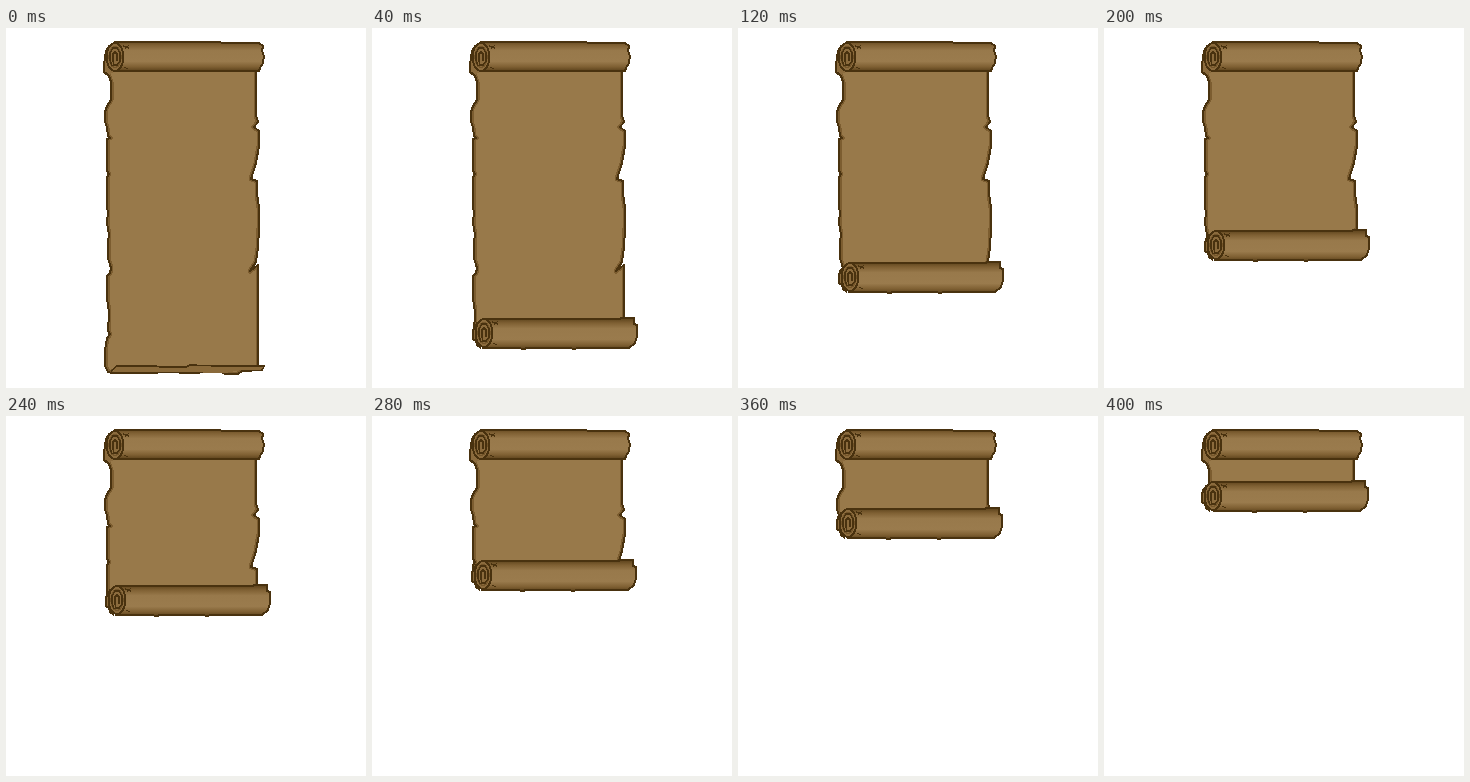
These frames come from a looping animation (360x360 px, 0.44 s). An HTML page:

```html
<!DOCTYPE html>
<html lang="en">
<head>
<meta charset="utf-8">
<title>Scroll rolling up</title>
<style>
  html, body { margin: 0; width: 100%; height: 100%; overflow: hidden; background: #fff; }
  svg { display: block; width: 100vw; height: 100vh; }
  .ink { fill: none; stroke: #49320f; stroke-width: 2; stroke-linejoin: round; }
  .soft { fill: none; stroke: #73552a; stroke-width: 1.5; }
  .rim { fill: none; stroke: #7c5d30; stroke-width: 5; stroke-linejoin: round; }
  .paper { fill: #98794a; }
  .body { fill: url(#round); }
</style>
</head>
<body>
<svg viewBox="0 0 360 360" shape-rendering="crispEdges">
  <defs>
    <linearGradient id="round" x1="0" y1="0" x2="0" y2="1">
      <stop offset="0" stop-color="#62471f"/>
      <stop offset=".14" stop-color="#806134"/>
      <stop offset=".32" stop-color="#98794b"/>
      <stop offset=".68" stop-color="#9a7b4d"/>
      <stop offset=".86" stop-color="#7f6033"/>
      <stop offset="1" stop-color="#5c421c"/>
    </linearGradient>
    <clipPath id="visible"><rect id="window" width="360" height="360"/></clipPath>
    <clipPath id="inside"><use href="#sheet"/></clipPath>
    <path id="sheet" d="M99 40V45L103 48 105 54V72L101 78 99 84V93L101 100 102 108 104 110 101 111V143L103 146 101 149V180L102 184 101 195 103 207 102 213V230L105 240 104 245 101 248V270L103 285 102 303 104 306 101 310 99 322V338L102 344 107 345H150L153 344H172L175 345 215 344 219 346H232L236 343 256 342 258 338H252V237L244 243 250 234 252 220 253 200V180L251 165V153L245 151 250 135 253 118V103L248 99 252 94 250 87V40Z"/>
    <g id="coil">
      <ellipse rx="9" ry="14" fill="#8b6b3d" class="edge"/>
      <ellipse rx="8.5" ry="14" class="ink"/>
      <ellipse rx="6" ry="10.5" class="soft"/>
      <path class="ink" style="stroke-width:1.6" d="M-3 9L-5 3V-4L-2 -9H2L5 -4V4L2 8H-1L-2 4V-3L0 -5 2 -3V4"/>
      <path class="ink" style="stroke-width:1.3" d="M8 -11L14 -9M10 -8L14 -12M9 10L13 12"/>
    </g>
  </defs>

  <g clip-path="url(#visible)">
    <use href="#sheet" class="paper"/>
    <use href="#sheet" class="rim" clip-path="url(#inside)"/>
    <use href="#sheet" class="ink"/>
    <path class="soft" d="M104 343L112 338"/>
    <path d="M110 338H182L184 337H253L257 339 255 342 236 342 219 345 175 344 107 344Z" fill="#8a6a3b"/>
    <path class="ink" style="stroke-width:1.5" d="M105 343L111 338H150L154 339H180L184 337 212 338H257"/>
  </g>

  <g id="top">
    <path d="M103 17L100 24 98 36V44L103 47 109 43Z" fill="#8b6b3d"/>
    <path class="ink" d="M104 17L100 23 98 36V44L103 47"/>
    <path class="body" d="M108 14H173L180 13H212L216 14H253L257 18 256 23 259 28 258 35 254 40 253 43H108Z"/>
    <path class="ink" d="M108 14H173L180 13.5H212L216 15H253L257 18 256 23 258 28 257 35 254 40 253 43H108"/>
    <use href="#coil" x="109" y="29"/>
  </g>

  <g id="roll">
    <g id="bar">
      <path class="body" d="M111 1H262V6L266 7V18L263 25 257 30H206L202 31 198 30H156L151 31 147 30H110Z"/>
      <path class="ink" d="M111 1H247L250 0H262V6L265 7V18L263 25 257 30H206L202 31 198 30H156L151 31 147 30H110"/>
    </g>
    <g id="end">
      <path d="M107 4L102 8 101 21 106 25 112 29V4Z" fill="#8b6b3d"/>
      <path class="ink" d="M106 4L102 9 101 14V21L104 23 105 27 109 30"/>
      <use href="#coil" x="112" y="15"/>
    </g>
  </g>
</svg>
<script>
  const STEP = 40;
  const tops = [338, 290, 261, 234, 218, 202, 169, 144, 119, 92, 65];
  const el = id => document.getElementById(id);
  const win = el("window"), roll = el("roll"), bar = el("bar"), end = el("end");
  const shift = (node, x, y) => node.setAttribute("transform", `translate(${x} ${y})`);

  function draw(ms) {
    const i = Math.floor(ms / STEP) % tops.length;
    const y = tops[i], open = i === 0;
    roll.setAttribute("display", open ? "none" : "inline");
    win.setAttribute("height", open ? 360 : y + 15);
    shift(roll, 0, y);
    shift(bar, i > 5 ? -1 : 0, 0);
    shift(end, i > 9 ? -3 : i > 8 ? -2 : i > 5 ? -1 : 0, 0);
  }

  function tick() {
    draw(performance.now());
    requestAnimationFrame(tick);
  }
  tick();
</script>
</body>
</html>
```
